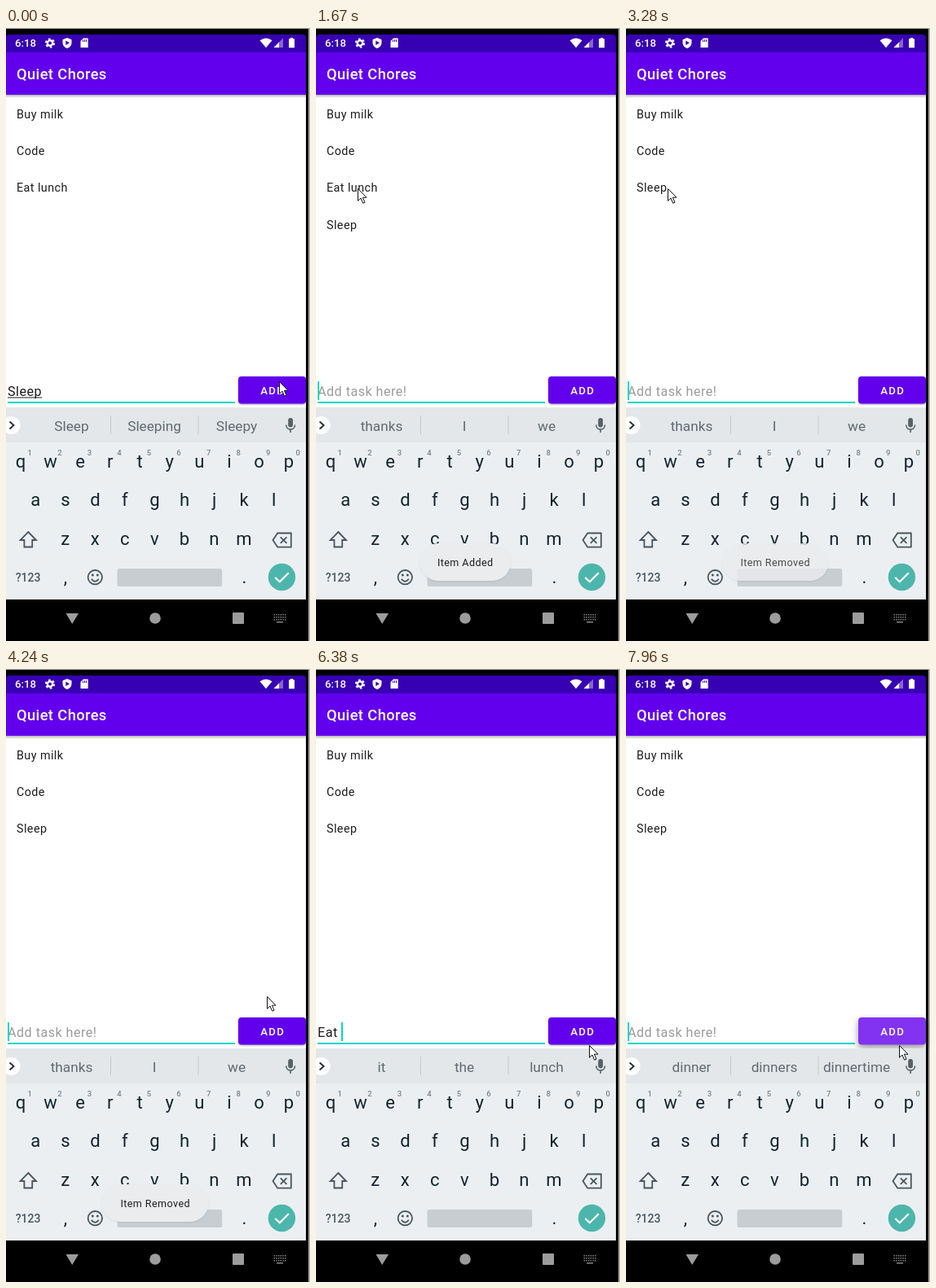
An HTML page that plays this animation: 373x753 px, repeating every 8000 ms.

```html
<!DOCTYPE html>
<html lang="en">
<head>
<meta charset="utf-8">
<title>Quiet Chores</title>
<style>
  html, body { margin: 0; width: 100%; height: 100%; overflow: hidden; background: #000; }
  svg { display: block; width: 373px; height: 753px; font-family: Roboto, "Open Sans", sans-serif; }
  text { white-space: pre; }
  .mid { text-anchor: middle; }
  .title { font-size: 18.3px; font-weight: 500; letter-spacing: .4px; fill: #fff; }
  .clock { font-size: 13.2px; font-weight: 500; fill: #fff; }
  .item { font-size: 14.3px; letter-spacing: .45px; fill: #1c1c1c; }
  .field { font-size: 16.1px; letter-spacing: .5px; fill: #1c1c1c; }
  .hint { fill: #9b9b9b; }
  .add { font-size: 13.2px; font-weight: 500; letter-spacing: 1.3px; fill: #fff; }
  .word { font-size: 17.2px; fill: #5f6a70; }
  .key { font-size: 22px; fill: #10252f; }
  .num { font-size: 9.5px; font-weight: 500; fill: #77838a; }
  .sym { font-size: 14px; font-weight: 500; fill: #47565e; }
  .toast text { font-size: 12.5px; letter-spacing: .45px; fill: #1f1f1f; }
  .line { fill: none; stroke: #47565e; stroke-width: 1.8; }
  .toast rect { filter: drop-shadow(0 1px 1px rgba(0, 0, 0, .08)); }
  #btn { fill: #6200ee; filter: drop-shadow(0 1px 1px rgba(0, 0, 0, .35)); }
  #btn.down { fill: #8133f1; filter: drop-shadow(0 4px 4px rgba(0, 0, 0, .4)); }
</style>
</head>
<body>
<svg viewBox="0 0 373 753">
  <defs>
    <linearGradient id="shade" x2="0" y2="1">
      <stop offset="0" stop-color="#000" stop-opacity=".3"/>
      <stop offset="1" stop-color="#000" stop-opacity="0"/>
    </linearGradient>
  </defs>
  <rect width="373" height="753"/>
  <path d="M0 0H373V753H371V1H0Z" fill="#a6a6a6"/>

  <!-- status bar -->
  <path d="M0 30V12Q0 8 4 8H364Q368 8 368 12V30Z" fill="#3700b3"/>
  <text class="clock" x="11" y="23">6:18</text>
  <g fill="#fff">
    <circle cx="54" cy="18.5" r="3.2" fill="none" stroke="#fff" stroke-width="2.4"/>
    <circle cx="54" cy="18.5" r="5.1" fill="none" stroke="#fff" stroke-width="2" stroke-dasharray="2.67 2.67"/>
    <path d="M75 12L80.5 14.3V18C80.5 21.5 78 24 75 25C72 24 69.5 21.5 69.5 18V14.3Z"/>
    <path d="M73.3 15.5L78 18.3L73.3 21.1Z" fill="#3700b3"/>
    <path d="M95 12.5H100.7V24H91.5V16Z"/>
    <path d="M94.5 14.6V17M96.5 14.2V17M98.5 14.2V17" stroke="#3700b3"/>
    <path d="M311.5 15.2Q319 9.6 326.5 15.2L319 24.3Z"/>
    <path d="M340 12.5V24H328.5Z" opacity=".4"/>
    <path d="M335 17.5V24H328.5Z"/>
    <path d="M349 12H352V13.3H354V24.3H347V13.3H349Z"/>
  </g>

  <!-- app -->
  <rect y="30" width="368" height="436" fill="#fff"/>
  <rect y="82" width="368" height="4" fill="url(#shade)"/>
  <rect y="30" width="368" height="52" fill="#6200ee"/>
  <text class="title" x="13" y="63">Quiet Chores</text>
  <g id="list"></g>
  <rect x="2" y="459" width="279" height="2" fill="#0bd5c4"/>
  <text class="field" id="field" x="2" y="452"></text>
  <rect id="under" y="453.5" height="1" fill="#1c1c1c"/>
  <rect id="caret" y="434" width="2" height="23" fill="#0bd5c4"/>
  <rect id="btn" x="285" y="428" width="83" height="33.5" rx="4"/>
  <text class="add" x="312.3" y="449.7">ADD</text>

  <!-- keyboard -->
  <rect y="466" width="368" height="43" fill="#e3e7e9"/>
  <rect y="509" width="368" height="193" fill="#eceff1"/>
  <circle cx="6.5" cy="488" r="11" fill="#fff"/>
  <path class="line" d="M4.5 483.5L9.5 488L4.5 492.5" style="stroke:#1d2c34"/>
  <path d="M128.5 476V499M236 476V499" stroke="#c3c9cc"/>
  <g id="words"></g>
  <rect x="346.2" y="479" width="5.8" height="11.5" rx="2.9" fill="#566168"/>
  <path class="line" d="M343.7 487.5C343.7 495 354.5 495 354.5 487.5M349.1 493V497" style="stroke:#566168;stroke-width:1.6"/>
  <g id="keys"></g>
  <path class="line" d="M27.3 619L37 629H32.2V637.5H22.4V629H17.6Z"/>
  <path class="line" d="M327.5 629L333.2 620.5H349.8V637.7H333.2ZM336.8 625.3L344.4 632.9M344.4 625.3L336.8 632.9"/>
  <text class="sym mid" x="27" y="680">?123</text>
  <text class="key mid" x="73" y="682">,</text>
  <text class="key mid" x="292.3" y="682">.</text>
  <circle class="line" cx="109.3" cy="674.7" r="8.7"/>
  <path class="line" d="M104.8 676.8Q109.3 683 113.8 676.8"/>
  <circle cx="106.3" cy="672" r="1.5" fill="#47565e"/>
  <circle cx="112.3" cy="672" r="1.5" fill="#47565e"/>
  <rect x="136.5" y="664" width="128.7" height="22" rx="2.5" fill="#c8cdd1"/>
  <circle cx="338.4" cy="674.5" r="16.7" fill="#4db6ac"/>
  <path d="M330.3 675L335.8 680.3L346.8 669.2" fill="none" stroke="#fff" stroke-width="2.2"/>

  <!-- navigation bar -->
  <g fill="#9c9c9c">
    <path d="M73.5 719H89L81.2 732Z"/>
    <circle cx="183" cy="725" r="6.8"/>
    <rect x="278" y="718" width="14" height="14" rx="1"/>
    <g id="dots" fill="#858585"><rect x="332" y="729" width="8" height="1.5"/></g>
  </g>

  <g class="toast" id="toast">
    <rect y="633" height="46" rx="23" fill="#ebecee"/>
    <text class="mid" x="183.2" y="661.3"></text>
  </g>
  <path id="mouse" d="M.5 .5V15.3L4 12L6.6 18.2L9 17.2L6.4 11.2H11Z" fill="#fff" stroke="#111" stroke-linejoin="round"/>
</svg>

<script>
const LOOP = 8000;
const $ = id => document.getElementById(id);

function add(parent, tag, attrs, text = "") {
  const el = document.createElementNS("http://www.w3.org/2000/svg", tag);
  for (const k in attrs) el.setAttribute(k, attrs[k]);
  el.textContent = text;
  return parent.appendChild(el);
}

// Static key rows: letters, first centre, baseline
const STEP = 36.55;
[["qwertyuiop", 18, 540], ["asdfghjkl", 36.3, 587], ["zxcvbnm", 72.7, 635]].forEach(([row, x0, y]) =>
  [...row].forEach((ch, i) => add($("keys"), "text", { class: "key mid", x: x0 + i * STEP, y }, ch)));
[..."1234567890"].forEach((n, i) =>
  add($("keys"), "text", { class: "num mid", x: 29.3 + i * STEP, y: 524.5 }, n));
for (let i = 0; i < 18; i++)
  add($("dots"), "rect", { x: 328.5 + i % 6 * 2.7, y: 720 + Math.floor(i / 6) * 3, width: 1.5, height: 1.5 });

const rows = [0, 1, 2, 3].map(i => add($("list"), "text", { class: "item", x: 13, y: 110.8 + i * 45.3 }));
const words = [80.5, 182, 283].map(x => add($("words"), "text", { class: "word mid", x, y: 494.5 }));

// Each track holds [start time, value]
const tracks = {
  list: [[0, "Buy milk,Code,Eat lunch"], [390, "Buy milk,Code,Eat lunch,Sleep"], [3010, "Buy milk,Code,Sleep"]],
  // "_" marks where the underlined word begins
  field: [[0, "_Sleep"], [270, ""], [5150, "_E"], [5670, "_Ea"], [5820, "_Eat"], [6380, "Eat "],
    [6840, "Eat _d"], [7080, "Eat _di"], [7230, "Eat _dinn"], [7380, "Eat _dinner"], [7960, ""]],
  words: [[0, "Sleep,Sleeping,Sleepy"], [390, "thanks,I,we"], [5150, "E,I,Eat"], [5670, "Ea,Eat,Each"],
    [5820, "Eat,Eats,Eaten"], [6380, "it,the,lunch"], [6960, "d,do,did"], [7080, "di,dinner,did"],
    [7230, "dinn,dinner,dinners"], [7380, "dinner,dinners,dinnertime"]],
  caret: [[0, 0], [270, 1], [810, 0], [1240, 1], [1820, 0], [2380, 1], [2740, 0], [3250, 1],
    [3760, 0], [4240, 1], [4750, 0], [5150, 1]],
  down: [[0, 0], [120, 1], [390, 0], [7810, 1]],
  toast: [[0, 0], [390, .15], [540, .55], [690, 1], [2500, .85], [2620, .6], [2740, 0],
    [3130, .4], [3250, .8], [3400, 1], [5300, .5], [5420, 0]],
  note: [[0, "Item Added"], [3010, "Item Removed"]],
  mouse: [[0, [335, 434]], [270, [339, 440]], [1240, [235, 335]], [1390, [114, 214]], [1670, [51, 197]],
    [3640, [75, 240]], [3760, [120, 310]], [3880, [170, 370]], [4000, [213, 399]],
    [4120, [295, 403]], [4240, [320, 402]], [4360, [345, 425]], [4480, [356, 450]], [4600, [335, 462]]]
};

function at(name, t) {
  let value;
  for (const [start, v] of tracks[name]) if (t >= start) value = v;
  return value;
}

function fill(els, csv) {
  const parts = csv.split(",");
  els.forEach((el, i) => el.textContent = parts[i] || "");
}

function drawField(raw, caretOn) {
  const field = $("field"), mark = raw.indexOf("_"), text = raw.replace("_", "");
  field.textContent = text || "Add task here!";
  field.classList.toggle("hint", !text);
  const width = text ? field.getComputedTextLength() : 0;
  const from = mark > 0 ? field.getSubStringLength(0, mark) : 0;
  $("under").setAttribute("x", 2 + from);
  $("under").setAttribute("width", mark < 0 ? 0 : width - from);
  $("caret").setAttribute("x", Math.round(2 + width));
  $("caret").setAttribute("opacity", caretOn);
}

function drawToast(note, alpha) {
  const [box, label] = $("toast").children;
  const half = note === "Item Added" ? 56 : 65.5;
  box.setAttribute("x", 183 - half);
  box.setAttribute("width", half * 2);
  label.textContent = note;
  $("toast").setAttribute("opacity", alpha);
}

function draw(t) {
  fill(rows, at("list", t));
  fill(words, at("words", t));
  drawField(at("field", t), at("caret", t));
  drawToast(at("note", t), at("toast", t));
  $("btn").classList.toggle("down", !!at("down", t));
  $("mouse").setAttribute("transform", `translate(${at("mouse", t)})`);
}

const begin = performance.now();
function tick() {
  draw((performance.now() - begin) % LOOP);
  requestAnimationFrame(tick);
}
tick();
</script>
</body>
</html>
```
